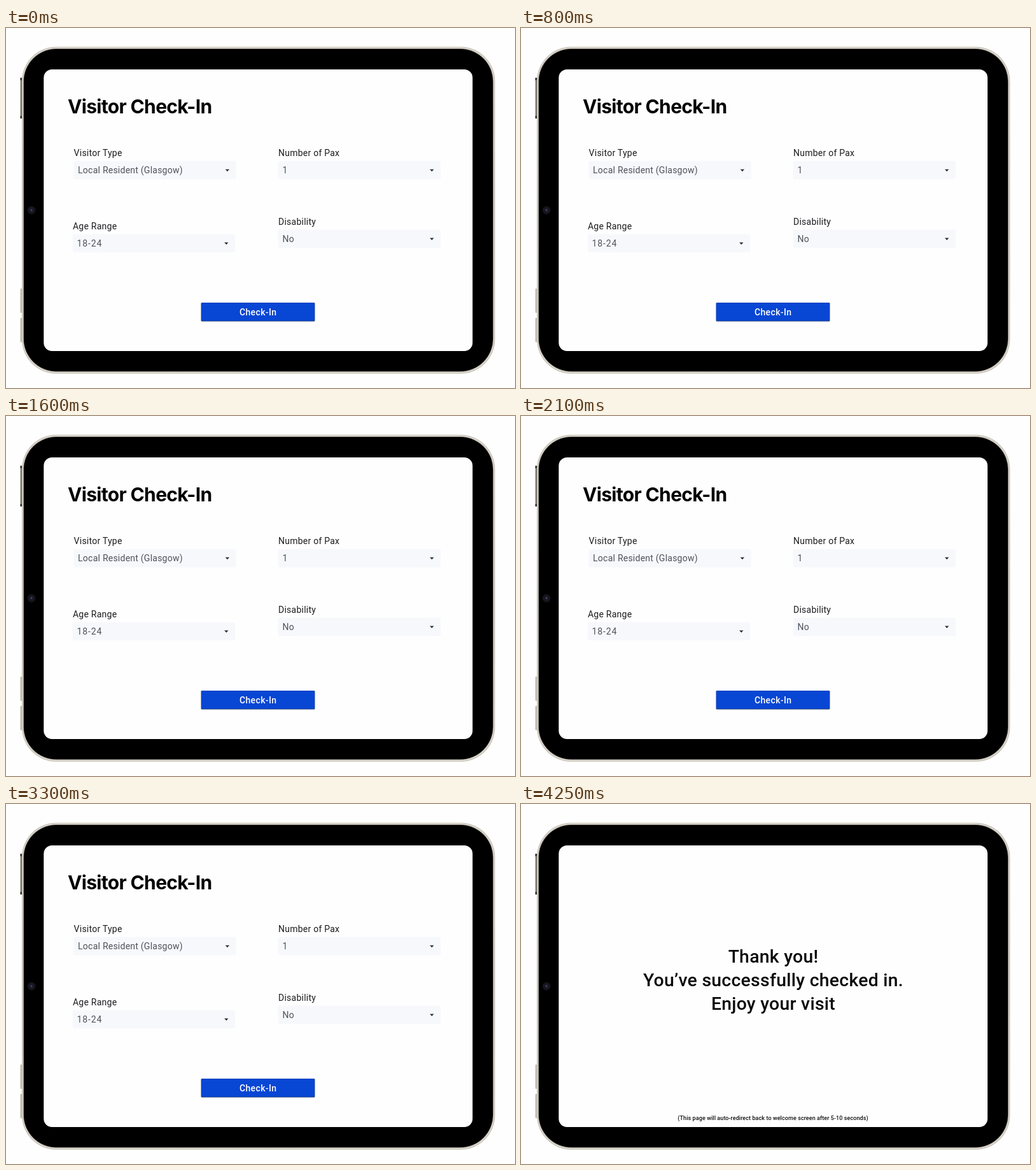
Recreate the animation shown at these times as an HTML page. Size 800 by 565 pixels, loop 8 s.

```html
<!DOCTYPE html>
<html lang="en">
<head>
<meta charset="utf-8">
<title>Visitor check-in</title>
<style>
  html, body { margin: 0; width: 100%; height: 100%; overflow: hidden; background: #fefefe; }
  svg { display: block; width: 800px; height: 565px; }
  text { font-family: Roboto, "Noto Sans", sans-serif; }
  .title { font: 700 30px Inter, sans-serif; letter-spacing: -.022em; fill: #000; }
  .label, .value { font-size: 14px; letter-spacing: .24px; }
  .label { fill: #1d1d20; }
  .value { fill: #50515a; }
  .digits { letter-spacing: .9px; }
  .action { font-size: 14px; font-weight: 500; letter-spacing: .4px; fill: #fff; }
  .thanks { font-size: 28.4px; font-weight: 500; letter-spacing: .25px; fill: #0a0a0a; }
  .note { font-size: 9px; font-weight: 500; letter-spacing: .08px; fill: #111; }
  .mid { text-anchor: middle; }
  #done { opacity: 0; }
</style>
</head>
<body>
<svg viewBox="0 0 800 565">
  <defs>
    <linearGradient id="metal" x1="0" y1="0" x2="0" y2="1">
      <stop offset="0" stop-color="#c9c5bb"/>
      <stop offset=".5" stop-color="#b9b4a9"/>
      <stop offset="1" stop-color="#c9c4b9"/>
    </linearGradient>
  </defs>

  <!-- tablet -->
  <rect x="22.6" y="78" width="3" height="64" rx="1" fill="#77736c"/>
  <rect x="22.6" y="78" width="2" height="4" fill="#222"/>
  <rect x="22.6" y="138" width="2" height="4" fill="#222"/>
  <rect x="22.4" y="409" width="3.4" height="38" rx="1" fill="#c4bfb4"/>
  <rect x="22.4" y="455" width="3.4" height="38" rx="1" fill="#c4bfb4"/>
  <rect x="25" y="29.5" width="743.5" height="513" rx="54" fill="url(#metal)"/>
  <rect x="26.3" y="30.8" width="740.9" height="510.4" rx="53" fill="#dedad1"/>
  <rect x="27.3" y="32.2" width="738.6" height="507.2" rx="52" fill="#77736b"/>
  <rect x="28" y="33" width="737.2" height="505.7" rx="51" fill="#000"/>
  <circle cx="40" cy="286" r="6.5" fill="#14141b"/>
  <circle cx="40" cy="286" r="3.4" fill="#1c1c2a"/>
  <circle cx="40" cy="285.8" r="1.2" fill="#4b4b6c"/>
  <rect x="59.3" y="65" width="674" height="442" rx="13" fill="#fefefe"/>

  <g id="form">
    <text class="title" x="97" y="133.5">Visitor Check-In</text>
    <g id="fields"></g>
    <rect x="306.5" y="431" width="179" height="29.6" rx="1.5" fill="#27417c"/>
    <rect x="307" y="431.3" width="178" height="28.2" rx="2" fill="#0846d4"/>
    <text class="action mid" x="396.2" y="451">Check-In</text>
  </g>

  <g id="done">
    <text class="thanks mid" x="396.5" y="249">Thank you!</text>
    <text class="thanks mid" x="396.5" y="286">You’ve successfully checked in.</text>
    <text class="thanks mid" x="396.5" y="323">Enjoy your visit</text>
    <text class="note mid" x="396" y="496">(This page will auto-redirect back to welcome screen after 5-10 seconds)</text>
  </g>
</svg>
<script>
  const LOOP = 8000, SWITCH = 3800;

  // x, y of the select box, label, value
  const fields = [
    [106.3, 209, 'Visitor Type', 'Local Resident (Glasgow)'],
    [427.7, 209, 'Number of Pax', '1'],
    [104.7, 323.8, 'Age Range', '18-24'],
    [427.7, 316.7, 'Disability', 'No']
  ];

  const drawField = ([x, y, label, value]) => `
    <text class="label" x="${x + .3}" y="${y - 8}">${label}</text>
    <rect x="${x}" y="${y}" width="255.5" height="28.3" rx="2" fill="#f7f8fc"/>
    <text class="value ${/^\d/.test(value) ? 'digits' : ''}" x="${x + 6.8}" y="${y + 19.2}">${value}</text>
    <path d="M${x + 238.4} ${y + 12.7}h6.4l-3.2 3.5z" fill="#2c2c32"/>`;

  document.getElementById('fields').innerHTML = fields.map(drawField).join('');

  // hard cut between the two screens
  const cut = (id, before, after) => {
    const offset = SWITCH / LOOP;
    document.getElementById(id).animate([
      { opacity: before, offset: 0 },
      { opacity: before, offset },
      { opacity: after, offset },
      { opacity: after, offset: 1 }
    ], { duration: LOOP, iterations: Infinity });
  };
  cut('form', 1, 0);
  cut('done', 0, 1);
</script>
</body>
</html>
```
